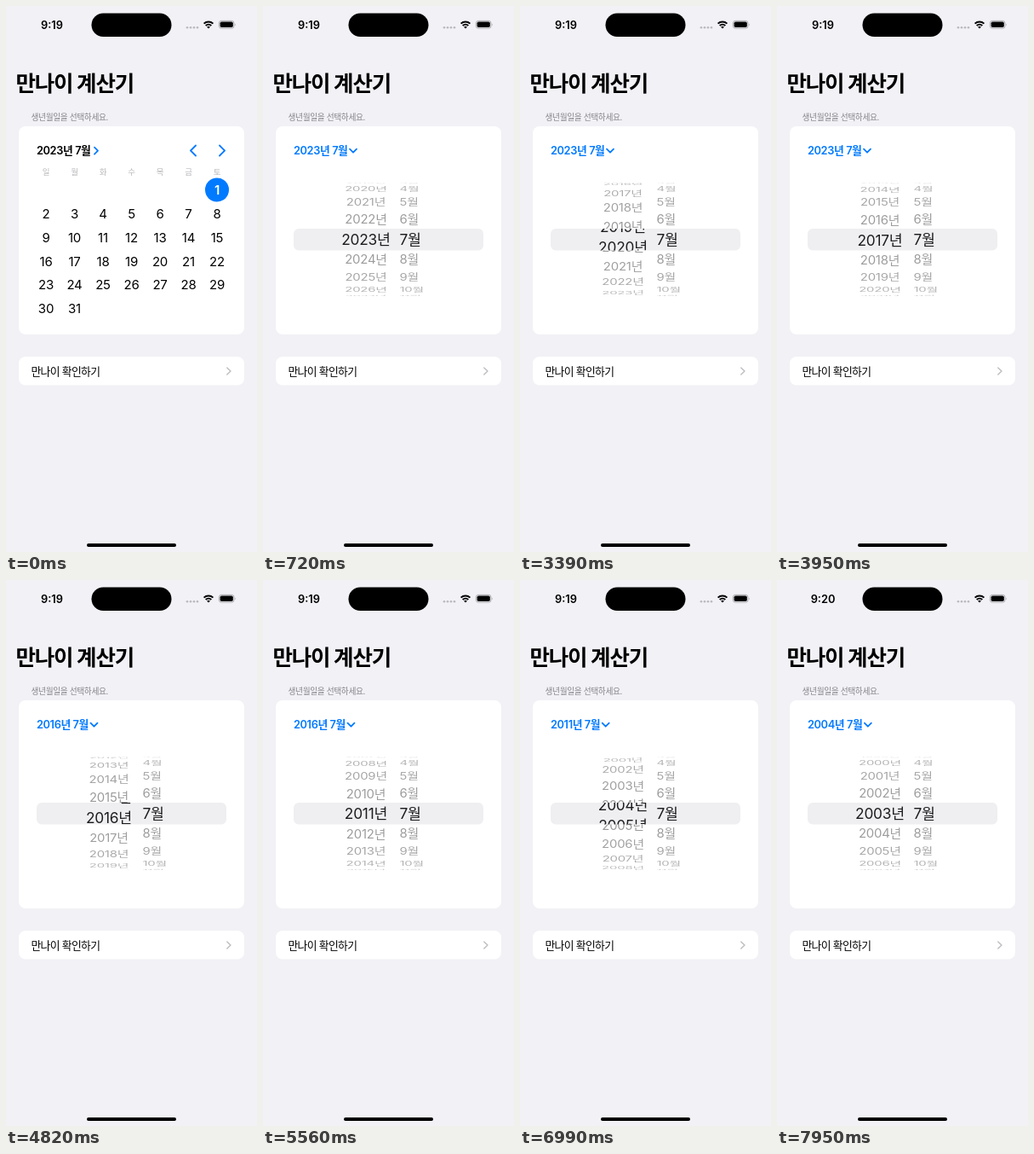
Write an HTML page that moves like this. It is 295x640 px and loops after 8 s.

```html
<!DOCTYPE html>
<html lang="ko">
<head>
<meta charset="utf-8">
<style>
html, body { margin: 0; width: 100%; height: 100%; overflow: hidden; background: #f1f1f6; }
svg { display: block; width: 295px; height: 640px; }
text { font-family: Inter, "Noto Sans CJK KR", sans-serif; font-size: 12.8px; }
.mid { text-anchor: middle; }
.line { fill: none; stroke: #007aff; stroke-width: 1.8; stroke-linecap: round; stroke-linejoin: round; }
</style>
</head>
<body>
<svg viewBox="0 0 295 640">
  <defs>
    <clipPath id="inLens"><rect x="36" y="261" width="223" height="25.5"/></clipPath>
    <clipPath id="offLens"><path d="M36 207.5H259V261H36ZM36 286.5H259V340H36Z"/></clipPath>
  </defs>
  <rect width="295" height="640" fill="#f1f1f6"/>

  <text id="clock" class="mid" x="54" y="26.6" font-weight="600">9:19</text>
  <rect x="100.5" y="8.5" width="94" height="27.5" rx="13.75"/>
  <g id="dots" fill="#b9b9be"></g>
  <g fill="none" stroke="#000" stroke-width="2">
    <path d="M232.6 20.6a7.8 7.8 0 0 1 10.8 0M234.7 23a4.8 4.8 0 0 1 6.6 0"/>
    <path d="M238 26.6l-1.9-2a2.8 2.8 0 0 1 3.8 0z" fill="#000" stroke="none"/>
    <rect x="250.4" y="17.4" width="17.6" height="8.8" rx="2.7" stroke="#9a9a9e" stroke-width=".8"/>
    <rect x="251.6" y="18.6" width="15.2" height="6.4" rx="1.7" fill="#000" stroke="none"/>
    <path d="M269.2 20.4q1.3 1.4 0 2.9z" fill="#9a9a9e" stroke="none"/>
  </g>

  <text x="11.5" y="100" font-weight="700" style="font-size:25.5px;letter-spacing:-1.2px">만나이 계산기</text>
  <text x="29.5" y="134.3" fill="#85858a" style="font-size:9.75px;letter-spacing:-.4px">생년월일을 선택하세요.</text>

  <rect x="15" y="141" width="265" height="244" rx="8" fill="#fff"/>
  <text id="head" x="36" y="174" font-weight="600" style="letter-spacing:-.4px"></text>
  <path id="arrow" class="line" d="M-2 -4L2 0L-2 4"/>

  <g id="calendar">
    <path class="line" d="M223 163.5L217 169.5L223 175.5M251 163.5L257 169.5L251 175.5" stroke-width="2"/>
    <circle cx="248" cy="215.5" r="14" fill="#007aff"/>
  </g>
  <g id="picker">
    <rect x="36" y="261" width="223" height="25.5" rx="6" fill="#efeff1"/>
    <g id="far" clip-path="url(#offLens)"></g>
    <g id="near" clip-path="url(#inLens)"></g>
  </g>

  <rect x="15" y="411" width="265" height="33.5" rx="8" fill="#fff"/>
  <text x="29.5" y="432.6" style="letter-spacing:-.65px">만나이 확인하기</text>
  <path class="line" d="M259.8 424L264 428L259.8 432" style="stroke:#bdbdc1;stroke-width:1.4"/>
  <rect x="95" y="630" width="105" height="4" rx="2"/>
</svg>
<script>
const LOOP = 8000, MID = 273.6, RADIUS = 67, STEP = 20.5 * Math.PI / 180, REACH = 5;
const $ = id => document.getElementById(id);

function add(parent, tag, attrs, text = "") {
  const el = document.createElementNS("http://www.w3.org/2000/svg", tag);
  for (const k in attrs) el.setAttribute(k, attrs[k]);
  el.textContent = text;
  return parent.appendChild(el);
}
function put(el, text) {
  if (el.textContent !== text) el.textContent = text;
}

for (let i = 0; i < 4; i++) add($("dots"), "circle", { cx: 213 + i * 4, cy: 25.3, r: 1.3 });

const colX = i => 47 + i * 33.5;
[..."일월화수목금토"].forEach((d, i) =>
  add($("calendar"), "text", { class: "mid", x: colX(i), y: 198.4, fill: "#b9b9bd", style: "font-size:9.5px" }, d));
for (let d = 1; d <= 31; d++) {
  const cell = d + 5, first = d === 1;
  add($("calendar"), "text", {
    class: "mid", x: colX(cell % 7), y: 221 + Math.floor(cell / 7) * 27.85,
    fill: first ? "#fff" : "#000", "font-weight": first ? 600 : 400,
    style: "font-size:15px;letter-spacing:-.2px"
  }, d);
}

// A wheel column: small grey rows outside the lens, larger dark rows inside it.
function column(x, anchor, unit) {
  const rows = [];
  for (let i = -REACH; i <= REACH; i++) {
    const row = (id, size, fill) => add($(id), "text", {
      y: size * .36, "text-anchor": anchor, fill, style: `font-size:${size}px;letter-spacing:-.2px`
    });
    rows.push({ i, far: row("far", 14.9, "#000"), near: row("near", 17.3, "#1c1c1e") });
  }
  return pos => {
    const base = Math.round(pos);
    for (const { i, far, near } of rows) {
      const value = base + i, angle = (value - pos) * STEP;
      const squash = Math.max(0, Math.cos(angle));
      const show = Math.abs(angle) < Math.PI / 2;
      const place = `translate(${x} ${MID + RADIUS * Math.sin(angle)}) scale(1 ${squash})`;
      for (const el of [far, near]) {
        put(el, value + unit);
        el.setAttribute("transform", place);
        el.setAttribute("visibility", show ? "inherit" : "hidden");
      }
      far.setAttribute("opacity", .2 + .2 * squash);
    }
  };
}
const setYear = column(121, "middle", "년");
const setMonth = column(160.5, "start", "월");
setMonth(7);

// Swipes: start, end, year reached, strength of the slowing down.
const swipes = [
  [3110, 3950, 2016.96, 2],
  [4060, 4420, 2016, 2],
  [4804, 5560, 2010.98, 2],
  [6060, 6200, 2011, 2],
  [6400, 6430, 2010.9, 1],
  [6540, 7330, 2004, 3.35],
  [7790, 7950, 2003, 2]
];
const heads = [[0, 2023], [4500, 2016], [6170, 2011], [7450, 2004]];
const ramp = (t, a, b) => Math.min(1, Math.max(0, (t - a) / (b - a)));

function yearAt(t) {
  let year = 2023;
  for (const [a, b, to, power] of swipes)
    year += (to - year) * (1 - Math.pow(1 - ramp(t, a, b), power));
  return year;
}

function draw(t) {
  const open = ramp(t, 480, 720);
  const blue = `rgb(0 ${122 * open} ${255 * open})`;
  const head = $("head");
  put($("clock"), t < 7820 ? "9:19" : "9:20");
  put(head, heads.filter(h => h[0] <= t).pop()[1] + "년 7월");
  head.setAttribute("fill", blue);
  const end = 36 + head.getComputedTextLength();
  $("arrow").setAttribute("transform", `translate(${end + 6.5} 169.7) rotate(${90 * open})`);
  $("calendar").setAttribute("opacity", 1 - open);
  $("picker").setAttribute("opacity", open);
  setYear(yearAt(t));
}

function tick() {
  draw(performance.now() % LOOP);
  requestAnimationFrame(tick);
}
tick();
</script>
</body>
</html>
```
